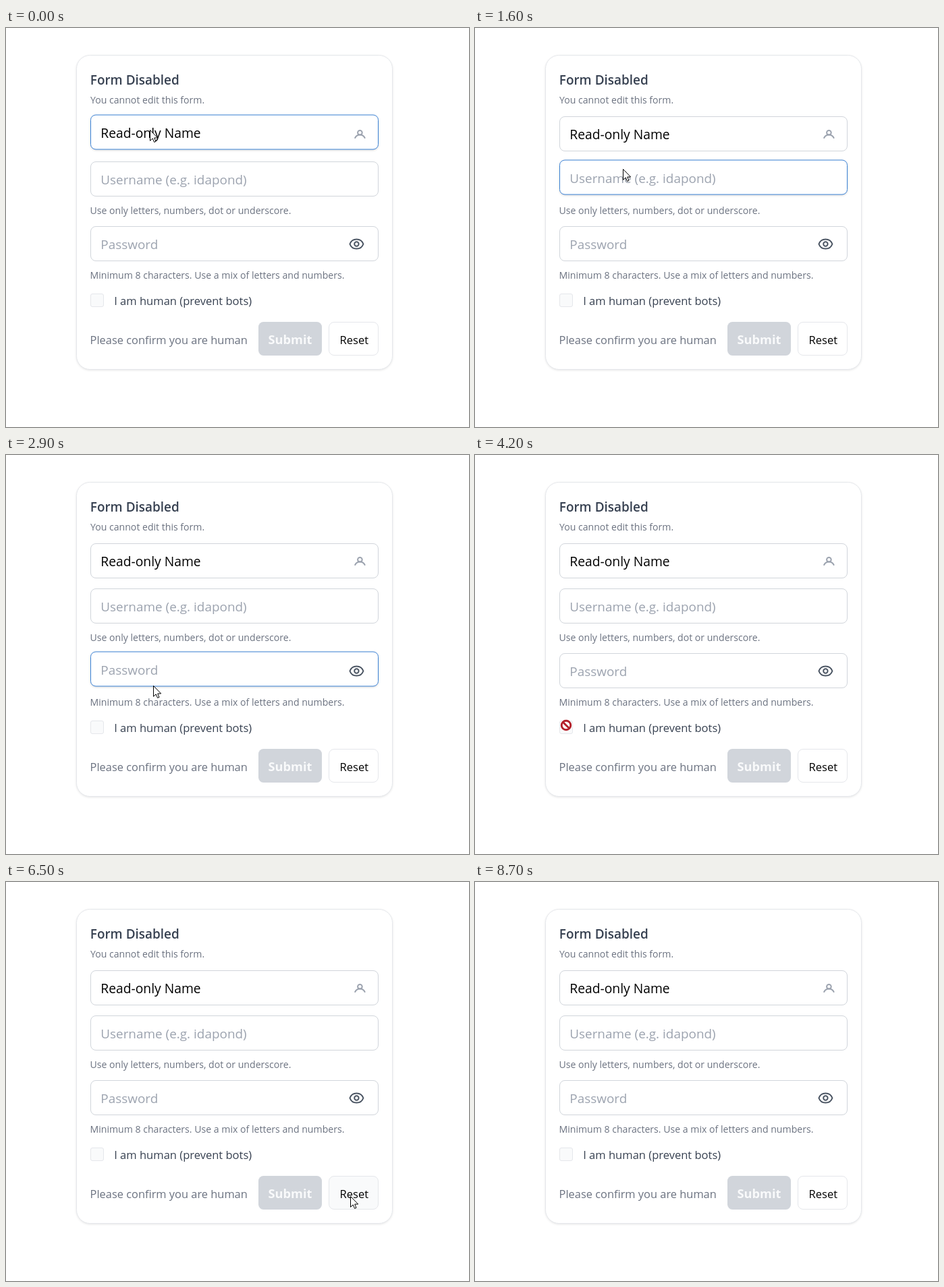
Write an HTML page that moves like this. It is 686x592 px and loops after 8.8 s.

```html
<!DOCTYPE html>
<html lang="en">
<head>
<meta charset="utf-8">
<title>Form Disabled</title>
<style>
  html, body { margin: 0; width: 100%; height: 100%; overflow: hidden; background: #fff; }
  svg { display: block; width: 686px; height: 592px; }
  text { font-family: "Open Sans", "Noto Sans", sans-serif; white-space: pre; }
  .title { font-size: 18.95px; font-weight: 600; fill: #374151; }
  .hint { font-size: 14.1px; fill: #6b7280; }
  .value { font-size: 19.25px; fill: #000; }
  .empty { font-size: 18.9px; fill: #9ca3af; }
  .label { font-size: 16.55px; fill: #374151; }
  .status { font-size: 16.4px; fill: #6b7280; }
  .submit { font-size: 18.2px; font-weight: 700; fill: #f9fafb; }
  .reset { font-size: 16.5px; fill: #000; }
  .card { filter: drop-shadow(0 1px 1.5px rgba(0, 0, 0, .1)); }
  .icon { fill: none; stroke-width: 2; stroke-linecap: round; stroke-linejoin: round; }
</style>
</head>
<body>
<svg id="stage" viewBox="0 0 686 592">
  <rect class="card" x="104.5" y="40.5" width="468" height="466" rx="20" fill="#fff" stroke="#e5e7eb"/>
  <text class="title" x="124.8" y="84">Form Disabled</text>
  <text class="hint" x="125" y="112">You cannot edit this form.</text>
  <g id="fields"></g>
  <g class="icon" stroke="#9ca3af">
    <circle cx="524.4" cy="155.2" r="3.3"/>
    <path d="M517.2 163C518.6 160.2 521.2 158.6 524.4 158.6S530.2 160.2 531.6 163"/>
  </g>
  <g class="icon" stroke="#4b5563">
    <path d="M509.5 320.5C511 316 515 313.4 519.4 313.4S527.9 316 529.4 320.5C527.9 325 523.9 327.6 519.4 327.6S511 325 509.5 320.5Z"/>
    <circle cx="519.4" cy="320.5" r="3.2"/>
  </g>
  <text class="hint" x="124.5" y="276">Use only letters, numbers, dot or underscore.</text>
  <text class="hint" x="124.5" y="372">Minimum 8 characters. Use a mix of letters and numbers.</text>
  <rect x="125.5" y="394.5" width="19" height="19" rx="2.5" fill="#f9fafb" stroke="#e5e7eb"/>
  <text class="label" x="160.2" y="411">I am human (prevent bots)</text>
  <text class="status" x="124.6" y="469">Please confirm you are human</text>
  <rect x="374" y="436" width="94" height="50" rx="7.5" fill="#d1d5db"/>
  <text class="submit" x="421" y="469" text-anchor="middle">Submit</text>
  <rect id="reset" x="478.5" y="436.5" width="73" height="49" rx="7.5" fill="#fff" stroke="#e5e7eb"/>
  <text class="reset" x="515.8" y="469" text-anchor="middle">Reset</text>

  <g id="arrow">
    <path d="M.5 .5V16.3L4.2 12.9 6.6 18.4 9 17.4 6.7 12H11.7Z" fill="#fff" stroke="#000" stroke-linejoin="round"/>
  </g>
  <g id="beam" fill="none">
    <path d="M-3 -7.5H-1L0 -6.5 1 -7.5H3M0 -6.5V6.5M-3 7.5H-1L0 6.5 1 7.5H3" stroke="#fff" stroke-width="2.6"/>
    <path d="M-3 -7.5H-1L0 -6.5 1 -7.5H3M0 -6.5V6.5M-3 7.5H-1L0 6.5 1 7.5H3" stroke="#111" stroke-width="1.2"/>
  </g>
  <g id="deny">
    <circle r="9" fill="#fff"/>
    <circle r="6.8" fill="none" stroke="#b3202b" stroke-width="2.9"/>
    <path d="M-4.8 -4.8L4.8 4.8" stroke="#b3202b" stroke-width="2.9"/>
  </g>
</svg>
<script>
const LOOP = 8800, STEP = 100, LIFT = 2.5, HIDE_AT = 8150;
const $ = id => document.getElementById(id);

// Pointer path: time, x, y
const path = [
  [0, 213, 151], [600, 215, 155], [1100, 218, 172], [1600, 219, 209],
  [2000, 219, 238], [2400, 219, 302], [2900, 218, 342], [3300, 190, 374],
  [3700, 140, 397], [4200, 135, 401], [4600, 136, 402], [5000, 235, 442],
  [5500, 358, 465], [5900, 425, 463], [6300, 508, 466], [6500, 510, 466],
  [7100, 511, 464], [7500, 480, 320], [7800, 440, 160], [8150, 420, 54]
];

const fields = [
  { y: 131, text: "Read-only Name", type: "value" },
  { y: 198, text: "Username (e.g. idapond)", type: "empty" },
  { y: 294, text: "Password", type: "empty" }
];

for (const f of fields) {
  f.node = document.createElementNS("http://www.w3.org/2000/svg", "g");
  f.node.innerHTML =
    `<rect x="125.5" y="${f.y + .5}" width="426" height="51" rx="7.5" fill="#fff"/>` +
    `<text class="${f.type}" x="140.3" y="${f.y + 34}">${f.text}</text>`;
  f.box = f.node.firstChild;
  $("fields").append(f.node);
}

const mix = (a, b, k) => a + (b - a) * k;
const blend = (a, b, k) => `rgb(${a.map((v, i) => Math.round(mix(v, b[i], k)))})`;
const within = (p, x, y, w, h) => p.x >= x && p.x < x + w && p.y >= y && p.y < y + h;

function pointer(t) {
  if (t >= HIDE_AT) return { x: -99, y: -99 };
  t = Math.max(0, t);
  const i = path.findIndex(k => k[0] > t);
  const [t0, x0, y0] = path[i - 1], [t1, x1, y1] = path[i];
  const k = (t - t0) / (t1 - t0), e = k * k * (3 - 2 * k);
  return { x: Math.round(mix(x0, x1, e)), y: Math.round(mix(y0, y1, e)) };
}

function cursorFor(p) {
  if (within(p, 125, 394, 20, 20) || within(p, 374, 436, 94, 50)) return "deny";
  const overText = within(p, 125, 452, 235, 24) || within(p, 125, 357, 376, 20) ||
    within(p, 125, 261, 298, 20);
  return overText ? "beam" : "arrow";
}

function render(t) {
  const p = pointer(t), before = pointer(t - STEP);
  for (const f of fields) {
    const over = q => within(q, 125, f.y - 2, 427, 52);
    const k = (over(p) + over(before)) / 2;
    f.node.setAttribute("transform", `translate(0 ${-LIFT * k})`);
    f.box.setAttribute("stroke", blend([209, 213, 219], [59, 130, 214], k));
    f.box.style.filter = k ? `drop-shadow(0 1px 1.5px rgba(0,0,0,${.16 * k}))` : "none";
  }
  $("reset").setAttribute("fill", within(p, 478, 436, 74, 50) ? "#f9fafb" : "#fff");
  const kind = cursorFor(p);
  for (const id of ["arrow", "beam", "deny"]) {
    $(id).style.display = id === kind ? "" : "none";
    $(id).setAttribute("transform", `translate(${p.x} ${p.y})`);
  }
}

const start = performance.now();
function tick() {
  const t = (performance.now() - start) % LOOP;
  render(Math.floor(t / STEP) * STEP);
  requestAnimationFrame(tick);
}
tick();
</script>
</body>
</html>
```
